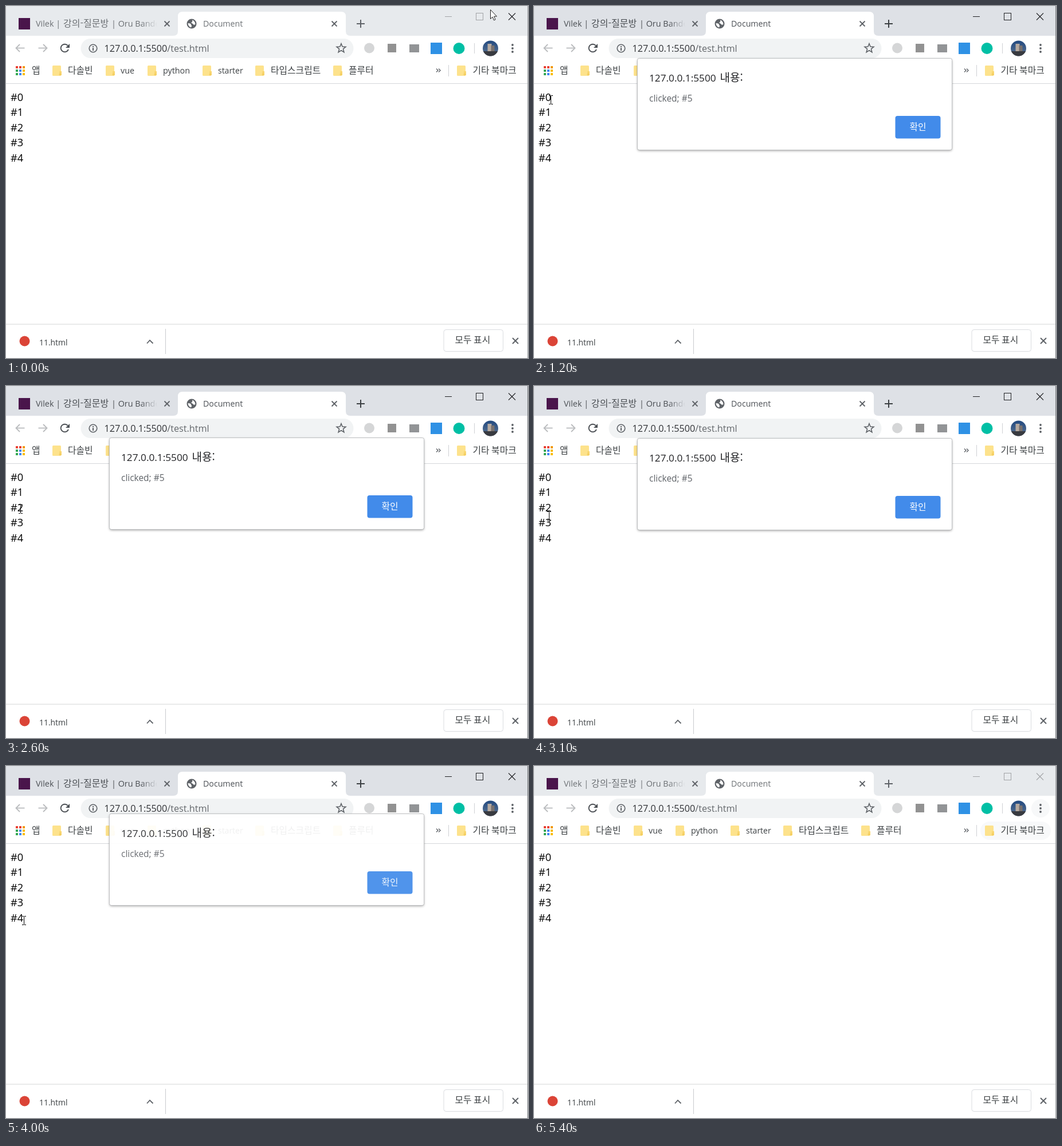
Recreate the animation shown at these times as an HTML page with a canvas. Size 911 by 615 pixels, loop 5500 ms.

```html
<!DOCTYPE html>
<html lang="ko">
<head>
<meta charset="utf-8">
<title>Document</title>
<style>
html, body { margin: 0; width: 100%; height: 100%; overflow: hidden; background: #fff; }
canvas { display: block; }
</style>
</head>
<body>
<canvas id="stage" width="911" height="615"></canvas>
<script>
const ctx = document.getElementById('stage').getContext('2d');
const LOOP = 5500;
const LATIN = '"Open Sans", "Noto Sans", sans-serif';
const HANGUL = '"Noto Sans CJK KR", "Noto Sans CJK", sans-serif';
const DARK = '#5f6368';

// [time, x, y, kind]; the last entry not later than now applies
const POINTER = [
  [0, 845, 6, 'arrow'], [100, 78, 260, 'arrow'], [200, 173, 225, 'arrow'],
  [400, 128, 204, 'arrow'], [500, 70, 165, 'arrow'], [600, 42, 162, 'arrow'],
  [700, 29, 164, 'beam'], [1500, 21, 178, 'beam'], [1600, 20, 190, 'beam'],
  [2100, 23, 206, 'beam'], [2200, 25, 215, 'beam'], [2800, 26, 227, 'beam'],
  [3500, 23, 240, 'beam'], [3800, 26, 258, 'beam'], [3900, 31, 270, 'beam'],
  [4500, 22, 270, 'beam'], [4800, 120, 240, 'arrow'], [4900, 520, 170, 'arrow'],
  [5000, 872, 103, 'arrow'], [5100, 805, 90, 'arrow'], [5200, 877, 66, 'arrow'],
  [5400, 0, 0, 'none']
];

// [time, vertical offset, opacity]
const DIALOG = [
  [0, 0, 0],
  [900, -18, .3], [1000, -8, .92], [1100, -2, 1], [1200, 0, 1],
  [1400, -2, 1], [1500, -10, .6], [1600, 0, 0],
  [1700, -14, .5], [1800, -4, .98], [1900, 0, 1],
  [2000, -4, .98], [2100, 0, 0],
  [2200, -18, .3], [2300, -5, .96], [2400, 0, 1],
  [2600, -1, 1], [2700, -12, .5], [2800, 0, 0],
  [3000, -8, .92], [3100, 0, 1],
  [3300, -4, .98], [3400, -14, .4], [3500, 0, 0],
  [3900, -18, .3], [4000, -8, .92], [4100, -2, 1], [4200, 0, 1],
  [4500, -1, 1], [4600, -4, .98], [4700, -14, .4], [4800, 0, 0]
];

const at = (keys, t) => keys.filter(k => k[0] <= t).pop();

function text(s, x, y, size, color, family = LATIN) {
  ctx.font = `${size}px ${family}`;
  ctx.fillStyle = color;
  ctx.fillText(s, x, y);
}

const korean = (s, x, y, color = '#3c4043', size = 15.8) => text(s, x, y, size, color, HANGUL);

function rect(x, y, w, h, color) {
  ctx.fillStyle = color;
  ctx.fillRect(x, y, w, h);
}

function round(x, y, w, h, r, fill, stroke) {
  ctx.beginPath();
  ctx.roundRect(x, y, w, h, r);
  paint(fill, stroke);
}

function disc(x, y, r, fill, stroke, width) {
  ctx.beginPath();
  ctx.arc(x, y, r, 0, Math.PI * 2);
  paint(fill, stroke, width);
}

function paint(fill, stroke, width = 1) {
  if (fill) { ctx.fillStyle = fill; ctx.fill(); }
  if (stroke) { ctx.strokeStyle = stroke; ctx.lineWidth = width; ctx.stroke(); }
}

function line(points, color, width = 1) {
  ctx.beginPath();
  points.forEach(([x, y]) => ctx.lineTo(x, y));
  paint(null, color, width);
}

function cross(x, y, r, color, width) {
  line([[x - r, y - r], [x + r, y + r]], color, width);
  line([[x - r, y + r], [x + r, y - r]], color, width);
}

function globe(x, y) {
  disc(x, y, 8.5, DARK);
  ctx.beginPath();
  ctx.moveTo(x - 6.5, y - 1);
  ctx.quadraticCurveTo(x - 1, y - 1, x - 1, y + 2);
  ctx.quadraticCurveTo(x + 1, y + 3, x - 1, y + 6.5);
  ctx.quadraticCurveTo(x - 6, y + 5, x - 6.5, y - 1);
  ctx.moveTo(x + 1, y - 6.5);
  ctx.quadraticCurveTo(x + 2, y - 3, x - 1, y - 2);
  ctx.quadraticCurveTo(x + 2, y, x + 4, y + 2);
  ctx.lineTo(x + 6.5, y + 1);
  ctx.quadraticCurveTo(x + 6, y - 5, x + 1, y - 6.5);
  paint('#fff');
}

function tabStrip(active, closeDark) {
  const edge = active ? '#202124' : '#a2a4a7';
  const label = active ? '#4b4f54' : '#6d7175';
  const strip = active ? '#dee1e6' : '#e7eaed';
  rect(0, 0, 911, 52, strip);

  ctx.beginPath();
  ctx.moveTo(292, 52);
  ctx.quadraticCurveTo(300, 52, 300, 44);
  ctx.lineTo(300, 18);
  ctx.quadraticCurveTo(300, 10, 308, 10);
  ctx.lineTo(585, 10);
  ctx.quadraticCurveTo(593, 10, 593, 18);
  ctx.lineTo(593, 44);
  ctx.quadraticCurveTo(593, 52, 601, 52);
  paint('#fff');

  rect(22, 21, 20, 20, '#4a154b');
  ctx.save();
  ctx.beginPath();
  ctx.rect(45, 12, 219, 36);
  ctx.clip();
  text('Vilek |', 52, 36, 14.4, label);
  korean('강의-질문방', 100, 36, label, 16);
  text('| Oru Bandel', 184, 36, 14.4, label);
  const fade = ctx.createLinearGradient(236, 0, 264, 0);
  fade.addColorStop(0, strip + '00');
  fade.addColorStop(1, strip);
  rect(236, 14, 28, 34, fade);
  ctx.restore();
  cross(281, 31, 4.5, DARK, 1.8);

  globe(324, 31);
  text('Document', 344, 36, 14.2, label);
  cross(573, 31, 4.5, DARK, 1.8);
  const plus = active ? '#3c4043' : DARK;
  line([[612, 31], [626, 31]], plus, 2);
  line([[619, 24], [619, 38]], plus, 2);

  line([[766, 18.5], [778, 18.5]], edge);
  ctx.strokeStyle = edge;
  ctx.strokeRect(820.5, 12.5, 12, 12);
  cross(883, 18.5, 6, closeDark ? '#202124' : edge, 1.1);
}

function arrowIcon(x, dir) {
  line([[x - 7.5 * dir, 73.5], [x + 7 * dir, 73.5]], '#babcbe', 1.8);
  line([[x + dir, 67], [x + 7.5 * dir, 73.5], [x + dir, 80]], '#babcbe', 1.8);
}

function star(x, y) {
  ctx.beginPath();
  for (let i = 0; i < 10; i++) {
    const a = -Math.PI / 2 + i * Math.PI / 5, r = i % 2 ? 3.6 : 8.3;
    ctx.lineTo(x + r * Math.cos(a), y + r * Math.sin(a));
  }
  ctx.closePath();
  paint(null, DARK, 1.6);
}

function avatar(x, y) {
  ctx.save();
  ctx.beginPath();
  ctx.arc(x, y, 13.5, 0, Math.PI * 2);
  ctx.clip();
  const sky = ctx.createLinearGradient(0, y - 13, 0, y + 13);
  sky.addColorStop(0, '#234a80');
  sky.addColorStop(1, '#5b7391');
  rect(x - 14, y - 14, 28, 28, sky);
  rect(x - 5, y - 8, 7, 21, '#b6aaa0');
  rect(x + 1, y - 5, 6, 18, '#77716f');
  rect(x - 14, y + 5, 28, 9, '#383a40');
  ctx.restore();
}

function toolbar(hover) {
  rect(0, 52, 911, 83, '#fff');
  if (hover) {
    disc(884, 74, 16, '#f7f8f9');
    round(779, 97, 123, 32, 16, '#f8f9fa');
  }
  arrowIcon(25, -1);
  arrowIcon(64, 1);
  ctx.beginPath();
  ctx.arc(102.5, 73.5, 6.8, .35, Math.PI * 1.78);
  paint(null, '#4b4f54', 1.9);
  ctx.beginPath();
  ctx.moveTo(111, 66);
  ctx.lineTo(111, 73);
  ctx.lineTo(104, 73);
  paint('#4b4f54');

  round(130.5, 57, 476, 34, 17, '#f1f3f4');
  disc(152, 74, 6.8, null, DARK, 1.6);
  rect(151, 73, 2, 5, DARK);
  rect(151, 70, 2, 2, DARK);
  text('127.0.0.1:5500', 171.5, 80, 16.2, '#303236');
  const w = ctx.measureText('127.0.0.1:5500').width;
  text('/test.html', 171.5 + w, 80, 16.2, '#64686c');
  star(585, 74);

  disc(634, 73.5, 9, '#d5d6d7');
  rect(666, 66, 15, 15, '#929292');
  rect(704, 67, 17, 14, '#929496');
  rect(741, 64, 20, 20, '#2f91e5');
  disc(790.5, 74, 10, '#00bfa5');
  rect(817, 65, 1, 18, '#cfd1d4');
  avatar(845.5, 74);
  [68, 74, 80].forEach(y => disc(884, y, 1.9, DARK));
}

function folder(x) {
  round(x, 104, 15, 18, 1.5, '#fde28c');
  rect(x + 12, 114, 4, 7, '#f9d671');
  disc(x + 13.5, 119.5, 2, '#f4cf63');
}

function bookmarks() {
  const hues = ['#ea4335', '#ea4335', '#f29900', '#34a853', '#4285f4', '#fbbc04', '#34a853', '#4285f4', '#fbbc04'];
  hues.forEach((c, i) => rect(17 + i % 3 * 6, 105 + Math.floor(i / 3) * 6, 4, 4, c));
  korean('앱', 45, 118);
  [81, 174, 247, 343, 435, 571, 787].forEach(folder);
  korean('다솔빈', 108, 118);
  text('vue', 200, 118, 14.3, '#3c4043');
  text('python', 274, 118, 14.3, '#3c4043');
  text('starter', 370, 118, 14, '#3c4043');
  korean('타입스크립트', 462, 118);
  korean('플루터', 598, 118);
  for (const x of [751, 755]) line([[x, 109.5], [x + 3, 112.5], [x, 115.5]], DARK, 1.4);
  rect(772, 103, 1, 20, '#cfd1d4');
  korean('기타 북마크', 814.5, 118);
  rect(0, 135, 911, 1, '#d5d7da');
}

function page() {
  rect(0, 136, 911, 420, '#fff');
  for (let i = 0; i < 5; i++) text('#' + i, 8, 166 + Math.round(i * 26.4), 18.2, '#000');
}

function shelf() {
  rect(0, 556, 911, 59, '#fff');
  rect(0, 555.5, 911, 1, '#d3d5d8');
  disc(32.5, 585.5, 9, '#db4437');
  text('11.html', 58, 593, 13.9, '#3c4043');
  line([[246, 589.5], [251, 584], [256.5, 589.5]], DARK, 1.8);
  rect(278, 564, 1, 44, '#c8cacd');
  round(764, 565.5, 103.5, 38, 4, '#fff', '#dadce0');
  korean('모두 표시', 783.5, 589);
  cross(889, 585, 5, DARK, 1.9);
}

// The shadow is kept outside the panel so that a fading panel stays white
function panel(x, y, w, h) {
  ctx.save();
  ctx.beginPath();
  ctx.rect(0, 0, 911, 615);
  ctx.roundRect(x, y, w, h, 3);
  ctx.clip('evenodd');
  ctx.shadowColor = 'rgba(0,0,0,.45)';
  ctx.shadowBlur = 4;
  ctx.shadowOffsetY = 1.5;
  round(x, y, w, h, 3, '#fff');
  ctx.restore();
  round(x, y, w, h, 3, '#fff');
  round(x - .5, y - .5, w + 1, h + 1, 3, null, '#bfc1c3');
}

function dialog(dy, alpha) {
  if (!alpha) return;
  ctx.save();
  ctx.translate(0, dy);
  ctx.globalAlpha = alpha;
  panel(181, 92, 548, 159);
  text('127.0.0.1:5500', 201, 132, 17.2, '#202124');
  korean('내용:', 324.5, 132, '#202124', 19);
  text('clicked; #5', 201, 167, 15.5, '#5f6368');
  round(630.5, 192, 79, 39.5, 4, '#428bea');
  korean('확인', 655.5, 216.5, '#fff');
  ctx.restore();
}

function pointer(x, y, kind) {
  if (kind === 'arrow') {
    const shape = [[0, 0], [0, 16], [3.6, 12.6], [6, 18.4], [8.6, 17.3], [6.2, 11.6], [11, 11.6]];
    ctx.beginPath();
    shape.forEach(([a, b]) => ctx.lineTo(x + a + .5, y + b + .5));
    ctx.closePath();
    paint('#fff', '#222');
  } else if (kind === 'beam') {
    rect(x, y - 7, 1, 14, '#000');
    for (const edge of [y - 8, y + 7]) {
      rect(x - 3, edge, 3, 1, '#000');
      rect(x + 1, edge, 3, 1, '#000');
    }
  }
}

function draw(t) {
  const active = t >= 900 && t < 5400;
  tabStrip(active, t < 100);
  toolbar(t >= 5400);
  bookmarks();
  page();
  shelf();
  rect(910, 0, 1, 615, active ? '#7c7f83' : '#a4a6a9');
  const [, dy, alpha] = at(DIALOG, t);
  dialog(dy, alpha);
  const [, x, y, kind] = at(POINTER, t);
  pointer(x, y, kind);
}

function tick() {
  draw(performance.now() % LOOP);
  requestAnimationFrame(tick);
}
tick();
</script>
</body>
</html>
```
